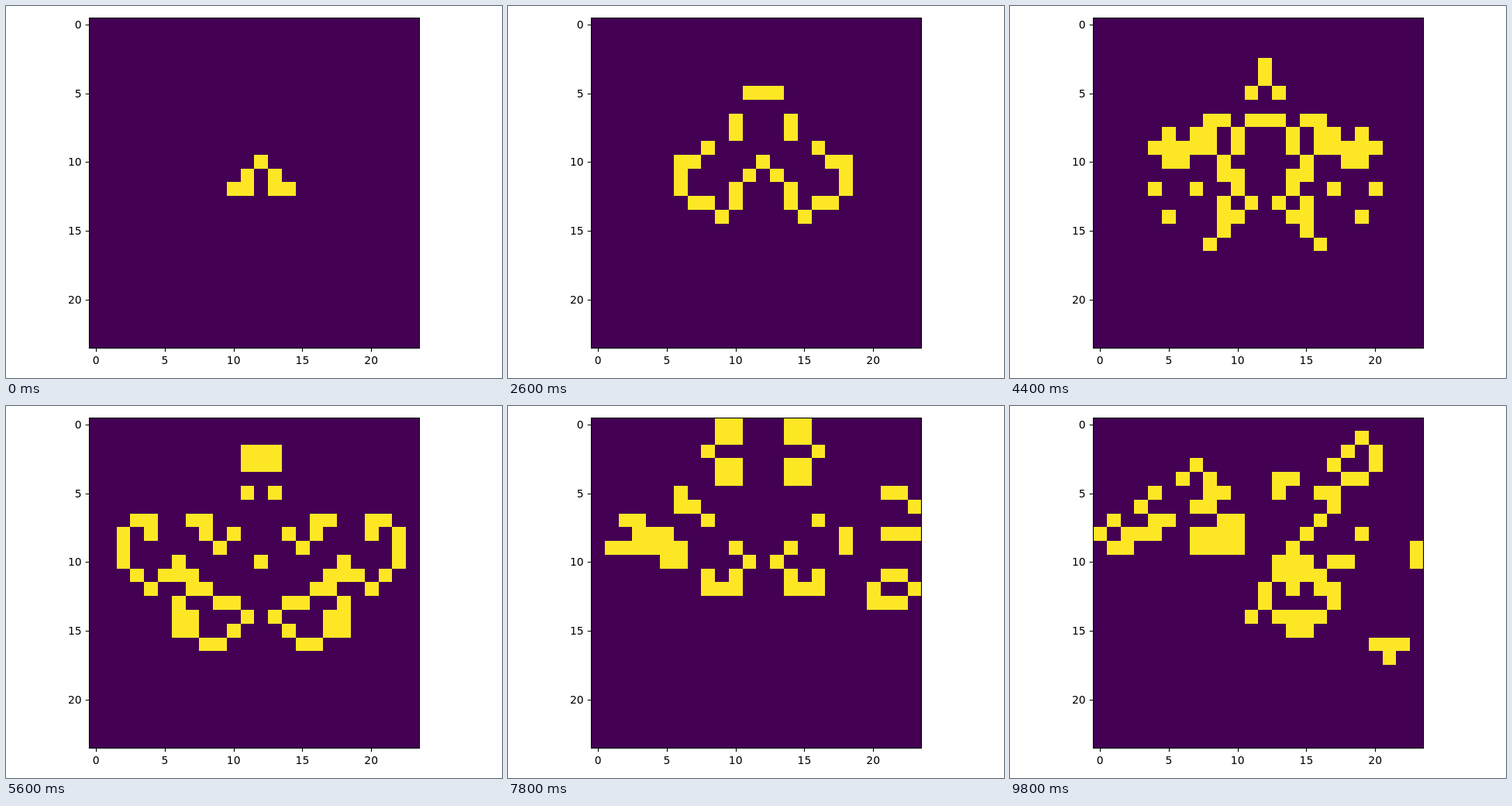
An HTML page that plays this animation: 640x480 px, repeating every 10 s.

```html
<!DOCTYPE html>
<html lang="en">
<head>
<meta charset="utf-8">
<title>Game of Life</title>
<style>
  html, body { margin: 0; width: 100%; height: 100%; overflow: hidden; background: #fff; }
  svg { display: block; }
  text { font: 13.889px "DejaVu Sans", sans-serif; }
  .lines { fill: none; stroke: #000; stroke-width: 1.11; }
</style>
</head>
<body>
<svg width="640" height="480" viewBox="0 0 640 480">
  <rect x="107" y="15" width="427" height="427" fill="#440154"/>
  <path id="cells" fill="#fde725" shape-rendering="crispEdges"/>
  <rect class="lines" x="107.5" y="15.5" width="426" height="426"/>
  <path id="ticks" class="lines"/>
  <g id="labels"></g>
</svg>
<script>
const SIZE = 24, GENERATIONS = 50, STEP_MS = 200;
const AXES = { left: 107.3, top: 14.9, cell: 17.75 };
const byId = id => document.getElementById(id);

// Live cells are kept as a set of row * SIZE + column; everything outside the grid is dead.
const seed = new Set([[10, 12], [11, 11], [11, 13], [12, 10], [12, 11], [12, 13], [12, 14]]
  .map(([row, col]) => row * SIZE + col));

function countNeighbours(live, row, col) {
  let count = 0;
  for (let r = Math.max(row - 1, 0); r <= Math.min(row + 1, SIZE - 1); r++)
    for (let c = Math.max(col - 1, 0); c <= Math.min(col + 1, SIZE - 1); c++)
      if ((r !== row || c !== col) && live.has(r * SIZE + c)) count++;
  return count;
}

function nextGeneration(live) {
  const next = new Set();
  for (let i = 0; i < SIZE * SIZE; i++) {
    const count = countNeighbours(live, Math.floor(i / SIZE), i % SIZE);
    if (count === 3 || (count === 2 && live.has(i))) next.add(i);
  }
  return next;
}

// Cell borders snap to whole pixels.
const edge = (origin, index) => Math.ceil(origin + index * 427 / SIZE - 0.5);

function cellPath(live) {
  return [...live].map(i => {
    const row = Math.floor(i / SIZE), col = i % SIZE;
    const left = edge(107, col), right = edge(107, col + 1);
    const top = Math.max(edge(14, row), 15), bottom = edge(14, row + 1);
    return `M${left} ${top}H${right}V${bottom}H${left}Z`;
  }).join("");
}

function addLabel(value, x, y, anchor) {
  const label = document.createElementNS("http://www.w3.org/2000/svg", "text");
  label.setAttribute("x", x);
  label.setAttribute("y", y);
  label.setAttribute("text-anchor", anchor);
  label.textContent = value;
  byId("labels").append(label);
}

function drawAxes() {
  let ticks = "";
  for (let value = 0; value < SIZE; value += 5) {
    const offset = (value + 0.5) * AXES.cell;
    const x = AXES.left + offset, y = AXES.top + offset;
    ticks += `M${Math.round(x) + 0.5} 441.5v4.86M107.5 ${Math.round(y) + 0.5}h-4.86`;
    addLabel(value, x, 462, "middle");
    addLabel(value, 97.6, Math.round(y + 5.2), "end");
  }
  byId("ticks").setAttribute("d", ticks);
}

const paths = [];
for (let live = seed; paths.length < GENERATIONS; live = nextGeneration(live))
  paths.push(cellPath(live));

const start = performance.now();
let shown = -1;
function render() {
  const elapsed = performance.now() - start;
  const generation = Math.floor(elapsed / STEP_MS) % GENERATIONS;
  if (generation !== shown) {
    byId("cells").setAttribute("d", paths[generation]);
    shown = generation;
  }
  requestAnimationFrame(render);
}

drawAxes();
render();
</script>
</body>
</html>
```
